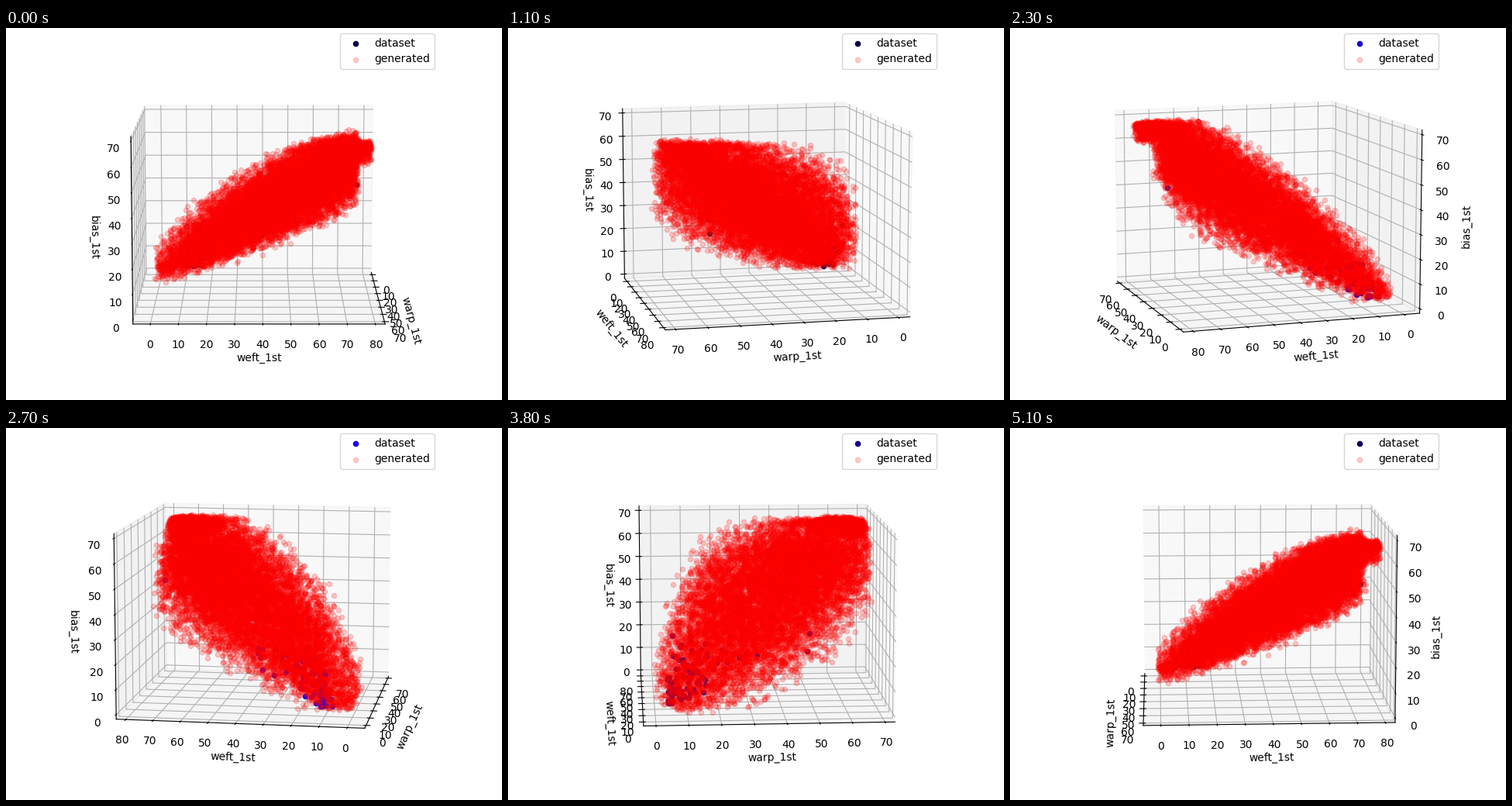
Animation of 640x480 px, one loop 5200 ms. Source, as a matplotlib script:

```python
import numpy as np
import matplotlib.pyplot as plt
from matplotlib.animation import FuncAnimation

FRAMES, STEP = 52, 7
MID = np.array([34.65, 38.65, 35.0])
rng = np.random.default_rng(7)


def plane(dx, dy):
    """Mean bias for offsets from the middle of the cloud."""
    return MID[2] + 0.38 * dx + 0.55 * dy


def make_cloud(count):
    x = rng.uniform(-2, 70.5, 110000)
    y = rng.uniform(-1, 78.5, 110000)
    dx, dy = x - MID[0], y - MID[1]
    along = 2.93 * dx + 2.34 * dy
    tip = along > 151

    # the low end narrows to a rounded point
    taper = np.clip((along + 172) / 170, 0.001, 1) ** 0.4
    across = (dx - 0.694 * dy + 3.5) / (40 * taper)

    # thin out towards the sides and the low end
    inside = (along > -171) & (along < 188) & (abs(across) < 1)
    inside &= (y < 75) | tip
    weight = (1.1 - across**2) * (0.3 + 0.7 * (along + 171) / 361)
    keep = inside & (rng.random(x.size) < weight)

    spread = 2 * rng.beta(2, 2, x.size) - 1
    z = plane(dx, dy) + 17 * taper * spread
    # stepped underside on the upper half
    z -= np.where(along > 0, 5 * (along / 38 % 1) * np.clip(-spread, 0, 1), 0)
    z = np.where(tip, np.maximum(z, rng.uniform(60, 66, x.size)), z)
    z = np.minimum(z, 67.7 - rng.uniform(0, 2.5, x.size))
    z = np.maximum(z, rng.uniform(1, 4, x.size))
    return np.array([x, y, z])[:, keep][:, :count]


def make_dataset(count):
    x = 4 + rng.exponential(9, count).clip(0, 36)
    y = 6 + 0.5 * (x - 4) + rng.exponential(7, count).clip(0, 25)
    z = plane(x - MID[0], y - MID[1]) + rng.normal(0, 3.5, count)
    strays = np.array([[48, 18.6, 21.5], [49, 22, 28], [51, 33, 35.7],
                       [37, 75, 45.6], [5, 10, 11], [8, 13, 4]])
    return np.hstack([[x, y, z.clip(4)], strays.T])


def tint(azim):
    blue = np.interp(azim, [0, 77, 133, 189, 231, 301, 360],
                     [0.3, 0.3, 0.65, 0.9, 0.63, 0.5, 0.34])
    return (0.12 * blue, 0, blue)


fig = plt.figure(figsize=(6.4, 4.8), dpi=100)
ax = fig.add_axes([0, 0, 1, 1], projection="3d", computed_zorder=False)
dots = ax.scatter(*make_dataset(95), s=20, color=tint(0), depthshade=False,
                  label="dataset", zorder=1)
ax.scatter(*make_cloud(12500), s=20, color="red", alpha=0.2, depthshade=False,
           label="generated", zorder=2)
ax.set(xlim=(-3.8, 73.1), ylim=(-6.2, 83.5), zlim=(-1.85, 71.85),
       xlabel="warp_1st", ylabel="weft_1st", zlabel="bias_1st")
legend = ax.legend(loc="upper right")


def update(i):
    azim = STEP * i
    # the tiny offset settles which side the axes take when seen head-on
    ax.view_init(elev=10, azim=azim + 0.01)
    dots.set_color(tint(azim))
    legend.legend_handles[0].set_color(tint(azim))
    return []


anim = FuncAnimation(fig, update, frames=FRAMES, interval=100, repeat=True,
                     repeat_delay=0)
plt.show()
```
